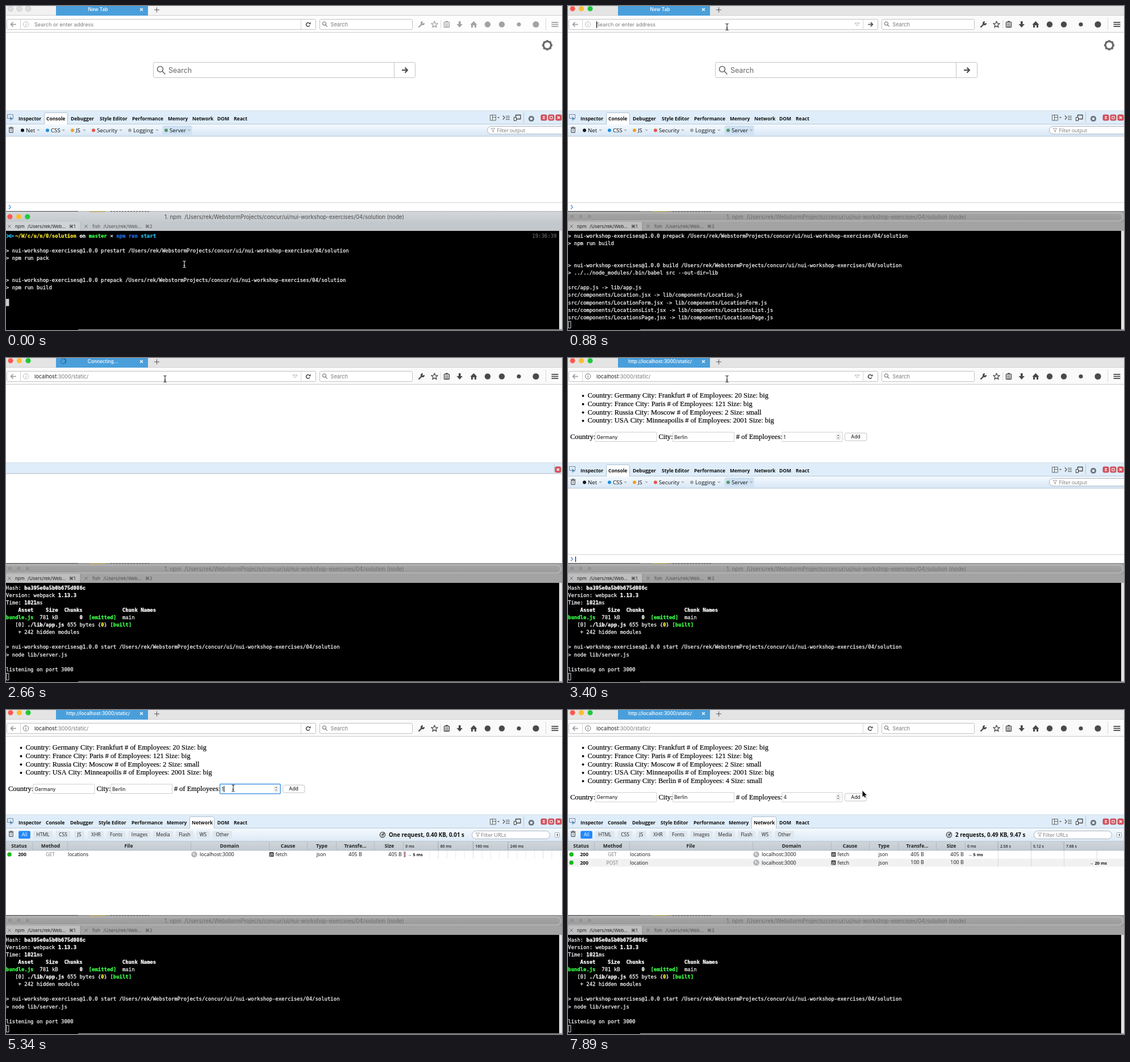
An HTML page with a canvas that plays this animation: 979x572 px, repeating every 8 s.

```html
<!DOCTYPE html>
<html lang="en">
<head>
<meta charset="utf-8">
<title>Workshop demo</title>
<style>
html, body { margin: 0; width: 100%; height: 100%; overflow: hidden; background: #fff; }
canvas { display: block; width: 979px; height: 572px; }
</style>
</head>
<body>
<canvas id="stage" width="979" height="572"></canvas>
<script>
const W = 979, H = 572, LOOP = 8000;
const c = document.getElementById('stage').getContext('2d');
const UI = 'Inter, Roboto, sans-serif';
const DEV = '"Open Sans", "Noto Sans", sans-serif';
const MONO = '"DejaVu Sans Mono", monospace';
const SERIF = '"Liberation Serif", serif';
// extra stroke that gives a font its heavier screen look
const HEAVY = { [MONO]: 0.3, [SERIF]: 0.2 };

// ---------- helpers ----------
function box(x, y, w, h, fill) {
  c.fillStyle = fill;
  c.fillRect(x, y, w, h);
}
function grad(x, y, w, h, a, b) {
  const g = c.createLinearGradient(0, y, 0, y + h);
  g.addColorStop(0, a);
  g.addColorStop(1, b);
  box(x, y, w, h, g);
}
function round(x, y, w, h, r, fill, stroke, lw = 1) {
  c.beginPath();
  c.roundRect(x, y, w, h, r);
  if (fill) { c.fillStyle = fill; c.fill(); }
  if (stroke) { c.strokeStyle = stroke; c.lineWidth = lw; c.stroke(); }
}
function dot(x, y, r, fill, stroke, lw = 1) {
  c.beginPath();
  c.arc(x, y, r, 0, 7);
  if (fill) { c.fillStyle = fill; c.fill(); }
  if (stroke) { c.strokeStyle = stroke; c.lineWidth = lw; c.stroke(); }
}
function path(color, lw, ...pts) {
  c.strokeStyle = color;
  c.lineWidth = lw;
  c.beginPath();
  for (let i = 0; i < pts.length; i += 2) c.lineTo(pts[i], pts[i + 1]);
  c.stroke();
}
function poly(fill, ...pts) {
  c.fillStyle = fill;
  c.beginPath();
  for (let i = 0; i < pts.length; i += 2) c.lineTo(pts[i], pts[i + 1]);
  c.fill();
}
// y is the middle of the capitals; returns the right edge
function text(s, x, y, size, color, family = UI, weight = 400, align = 'left') {
  const base = y + size * (family === SERIF ? 0.33 : 0.36);
  c.font = `${weight} ${size}px ${family}`;
  c.textAlign = align;
  c.fillStyle = c.strokeStyle = color;
  c.fillText(s, x, base);
  if (HEAVY[family]) {
    c.lineWidth = HEAVY[family];
    c.strokeText(s, x, base);
  }
  return x + c.measureText(s).width;
}
function cross(x, y, r, color, lw = 1) {
  path(color, lw, x - r, y - r, x + r, y + r);
  path(color, lw, x - r, y + r, x + r, y - r);
}
function arrow(x, y, r, color, lw) {
  path(color, lw, x - r, y, x + r, y);
  path(color, lw, x + r * 0.1, y - r * 0.9, x + r, y, x + r * 0.1, y + r * 0.9);
}
function lens(x, y, r, color, lw) {
  dot(x, y, r, null, color, lw);
  path(color, lw, x + r * 0.7, y + r * 0.7, x + r * 1.8, y + r * 1.8);
}
function gear(x, y, r, color, lw) {
  for (let i = 0; i < 8; i++) {
    const a = i * Math.PI / 4, u = Math.cos(a), v = Math.sin(a);
    path(color, lw, x + u * r, y + v * r, x + u * r * 1.35, y + v * r * 1.35);
  }
  dot(x, y, r, null, color, lw);
}
function reload(x, y, color) {
  c.strokeStyle = color;
  c.lineWidth = 1.5;
  c.beginPath();
  c.arc(x, y, 3.3, 0.5, 5.4);
  c.stroke();
  poly(color, x + 4.5, y - 4.3, x + 4.5, y - 0.4, x + 0.6, y - 0.4);
}
function globe(x, y, r) {
  dot(x, y, r, '#b4b8bc', '#8d9194', 0.8);
  poly('#e4e6e8', x - r * 0.6, y - r * 0.5, x + r * 0.2, y - r * 0.7, x, y + r * 0.1, x - r * 0.4, y + r * 0.3);
  poly('#e4e6e8', x + r * 0.1, y + r * 0.3, x + r * 0.7, y, x + r * 0.3, y + r * 0.7);
}

// ---------- timeline ----------
const ticks = [0, 150, 300, 450, 590, 740, 880, 1030, 1330, 1630, 2220, 2520, 2660, 2810, 2960,
  3110, 3250, 3400, 3550, 3700, 3850, 4450, 4600, 4750, 4900, 5040, 5190, 5340, 6090, 6390,
  6990, 7140, 7290, 7440, 7590, 7740, 7890];
const latest = (list, t) => list.filter(v => v <= t).pop();
const step = (list, t) => list.filter(v => v[0] <= t).pop()[1];

// start, end, then from and to points
const moves = [
  [0, 740, 314, 456, 280, 37],
  [3400, 3550, 280, 37, 345, 199],
  [4300, 4900, 345, 199, 374, 94],
  [4900, 5190, 374, 94, 400, 138],
  [6840, 7440, 400, 138, 519, 143]
];
function mouseAt(t) {
  const m = moves.filter(v => v[0] <= t).pop();
  const p = Math.min(1, (t - m[0]) / (m[1] - m[0])), e = p * p * (3 - 2 * p);
  return [m[2] + (m[4] - m[2]) * e, m[3] + (m[5] - m[3]) * e];
}
function drawMouse(t) {
  const [x, y] = mouseAt(t);
  const inUrl = y > 23 && y < 42 && x > 45 && x < 519;
  const inField = t > 4450 && y > 130 && y < 148 && x > 377 && x < 470;
  if (y > 397 || inUrl || inField) {
    const ink = y > 397 ? '#fff' : '#111';
    path(ink, 1, x, y - 5, x, y + 5);
    path(ink, 1, x - 2.5, y - 6, x, y - 5, x + 2.5, y - 6);
    path(ink, 1, x - 2.5, y + 6, x, y + 5, x + 2.5, y + 6);
    path(ink, 1, x - 1.5, y + 2, x + 1.5, y + 2);
  } else {
    const pts = [0, 0, 0, 11, 2.5, 8.7, 4.2, 12.3, 5.9, 11.5, 4.3, 8, 7.6, 8];
    const q = pts.map((v, i) => v + (i % 2 ? y : x) - 0.5);
    path('#fff', 1.6, ...q, q[0], q[1]);
    poly('#111', ...q);
  }
}

// ---------- browser chrome ----------
function drawChrome(t) {
  const on = t >= 740, typed = t >= 1630 && t < 2520;
  const loading = t >= 2520 && t < 2960, loaded = t >= 2960;
  const ink = on ? '#4a4a4a' : '#a3a3a3';
  box(0, 0, W, 17, on ? '#e4e4e4' : '#f5f5f5');
  if (!on) box(0, 0, 88, 17, '#f1f1f1');
  box(0, 17, W, 29, on ? '#fafafa' : '#fdfdfd');
  box(0, 16, W, 1, '#cfcfcf');
  box(0, 46, W, 1, '#c9c9c9');
  ['#ff5a52', '#fdbc2e', '#22c93a'].forEach((col, i) =>
    dot(8 + i * 15.5, 4.8, 4.6, on ? col : '#dedede', on ? null : '#c4c4c4'));
  box(88, 0, 162, 17, '#4a9fdb');
  const title = loaded ? 'http://localhost:3000/static/' : loading ? 'Connecting...' : 'New Tab';
  text(title, loading ? 170.5 : 162, 6.3, 8.3, '#fff', UI, 500, 'center');
  if (loading) {
    const a = t / 150;
    dot(101, 5.5, 4.4, null, '#3a7cae', 1.6);
    c.strokeStyle = '#2a5f8a';
    c.beginPath();
    c.arc(101, 5.5, 4.4, a, a + 2);
    c.stroke();
  }
  cross(238.5, 6.3, 2.3, '#fff', 1.4);
  path('#555', 1, 261, 6.8, 270, 6.8);
  path('#555', 1, 265.5, 2.3, 265.5, 11.3);

  round(1.5, 23.5, 544, 18, 2, '#fff', '#c2c2c2');
  box(25, 24, 1, 17, '#d0d0d0');
  box(519, 24, 1, 17, '#d8d8d8');
  path('#9a9a9a', 1.7, 8.5, 32.5, 17.5, 32.5);
  path('#9a9a9a', 1.7, 12.5, 28.5, 8.5, 32.5, 12.5, 36.5);
  const info = loaded ? '#666' : '#b5b5b5';
  dot(35, 32.4, 4.7, null, info, 0.9);
  box(34.5, 31.5, 1, 3.6, info);
  box(34.5, 29.5, 1, 1.1, info);

  if (t < 1630) text('Search or enter address', 50, 32.6, 9.16, '#7a7a7a');
  else if (typed) {
    const end = text('http://localhost:3000/static/', 50, 32.6, 9.18, '#1e1e1e');
    if (t < 2220) box(end + 0.5, 27, 1, 12, '#000');
  } else {
    const end = text('localhost', 50, 32.6, 9.18, '#222');
    text(':3000/static/', end, 32.6, 9.18, '#777');
  }
  if (t >= 740 && t < 1330) box(50, 27, 1, 12, '#000');
  if (on && t < 3550) {
    c.lineWidth = 0.9;
    c.strokeStyle = '#aaa';
    c.beginPath();
    c.moveTo(505, 30); c.lineTo(513, 30); c.lineTo(509, 35); c.closePath();
    c.stroke();
  }
  if (on && t < 2520) arrow(532.5, 32.5, 4, '#444', 1.6);
  else reload(532, 32.7, '#444');
  round(552.5, 23.5, 163, 18, 2, '#fff', '#c2c2c2');
  lens(560.5, 31, 3, '#777', 1.1);
  text('Search', 571.5, 32.6, 9.2, '#7a7a7a');

  // toolbar icons
  path(ink, 2.4, 726.5, 37.5, 733, 31);
  dot(733.5, 30.5, 3.5, ink);
  poly('#fafafa', 733, 31, 734.5, 26, 738.5, 29.5);
  const star = [];
  for (let i = 0; i <= 10; i++) {
    const r = i % 2 ? 2.6 : 6, a = i * Math.PI / 5;
    star.push(754.5 + r * Math.sin(a), 32.8 - r * Math.cos(a));
  }
  path(ink, 1.3, ...star);
  box(765, 25, 1, 14, '#dcdcdc');
  round(771.5, 28.5, 9, 9, 1, null, ink, 1.4);
  [31, 33.2, 35.4].forEach(y => box(773, y, 6, 1, ink));
  box(774, 26.6, 4, 2, ink);
  box(797, 27, 3.6, 6, ink);
  poly(ink, 793.5, 32, 804, 32, 798.8, 38);
  poly(ink, 817.5, 33, 823.5, 26.8, 829.5, 33, 828, 33, 828, 38, 825, 38, 825, 34, 822, 34, 822, 38, 819, 38, 819, 33);
  [[848, 5.2], [873, 5.2], [903, 3.6], [933, 5.6]].forEach(([x, r]) => dot(x, 32.5, r, ink));
  box(950, 21, 1, 22, '#d8d8d8');
  [28, 31.6, 35.2].forEach(y => box(960.5, y, 12, 1.8, ink));
}

function drawPopup() {
  box(0, 47, W, 99, '#fff');
  grad(0, 146, W, 9, '#8f8f8f', 'rgba(220,220,220,0.35)');
  box(1, 50, 978, 23, '#1b83e9');
  globe(35, 61.5, 4.8);
  const end = text('http://localhost:3000/static/', 50, 62, 10.75, '#fff', UI, 600);
  text('— Visit', end + 4, 62.3, 9.2, '#fff');
  ['', '#/', '#/add'].forEach((tail, i) => {
    const y = 85.5 + i * 23.2;
    globe(35, y - 0.8, 4.8);
    text('localhost', 50, y, 10.7, '#222');
    text('—', 100, y, 9.2, '#999');
    text('localhost:3000/static/' + tail, 114, y + 0.3, 9.2, '#2362c0');
  });
}

// ---------- page ----------
function drawNewTab() {
  gear(953, 69.3, 6.8, '#6b6b6b', 3.2);
  round(259.5, 99.5, 461, 27, 2, '#fff', '#c4c4c4');
  box(683, 100, 1, 26, '#c4c4c4');
  lens(271.5, 111.5, 5, '#666', 1.6);
  text('Search', 286, 113.2, 12.4, '#666');
  arrow(702, 113.2, 5, '#4a4a4a', 2.2);
}
function field(x, y, w, value) {
  round(x + 0.5, y - 8, w, 16.5, 0.5, '#fff', '#cfcfcf');
  text(value, x + 3, y + 0.5, 8.6, '#111');
}
function drawPage(t) {
  const rows = ['Germany City: Frankfurt # of Employees: 20 Size: big', 'France City: Paris # of Employees: 121 Size: big',
    'Russia City: Moscow # of Employees: 2 Size: small', 'USA City: Minneapoilis # of Employees: 2001 Size: big'];
  if (t >= 7740) rows.push('Germany City: Berlin # of Employees: 4 Size: small');
  rows.forEach((s, i) => {
    const y = 66.2 + i * 14.7;
    dot(26.5, y + 0.6, 1.9, '#000');
    text('Country: ' + s, 34.5, y, 12.43, '#000', SERIF);
  });
  const y = 139 + (rows.length - 4) * 14.7;
  const label = (s, x) => text(s, x, y - 0.3, 12.43, '#000', SERIF);
  label('Country:', 4);
  field(47.5, y, 108, 'Germany');
  label('City:', 159.5);
  field(184, y, 108, 'Berlin');
  label('# of Employees:', 296);
  const focus = t >= 5340 && t < 7590;
  field(376.5, y, 106, t < 6090 ? '1' : t < 6390 ? '' : '4');
  if (focus) {
    round(376.7, y - 8.2, 106.4, 17, 1.5, null, '#6fb0ec', 2);
    if (t < 6090) box(383.5, y - 5, 1, 11, '#000');
  }
  round(472.5, y - 5, 6.5, 10.5, 3, '#fff', '#c8c8c8', 0.8);
  poly('#666', 474, y - 1, 477.6, y - 1, 475.8, y - 3.4);
  poly('#666', 474, y + 1.4, 477.6, y + 1.4, 475.8, y + 3.8);
  const down = t >= 7590 && t < 7740;
  round(487.5, y - 6.5, 38.5, 13.5, 3, down ? '#4a90e8' : '#fff', '#c3c3c3');
  text('Add', 506.5, y + 0.4, 8.6, down ? '#fff' : '#111', UI, 400, 'center');
}

// ---------- developer tools ----------
const tabNames = ['Inspector', 'Console', 'Debugger', 'Style Editor', 'Performance', 'Memory', 'Network', 'DOM', 'React'];
const consoleX = [22, 71, 114, 165, 222, 285, 328, 372, 401];
const networkX = [22, 70, 113, 163, 221, 283, 327, 372, 401];

function redButton(x, kind) {
  round(x - 5, 192, 10, 10, 2, '#d9525c', '#b5404a', 0.8);
  if (kind === 0) { box(x - 1.5, 194.5, 3, 2, '#fff'); box(x - 1.5, 197.5, 3, 2, '#fff'); }
  if (kind === 1) round(x - 2.2, 194.8, 4.4, 4.4, 0, null, '#fff');
  if (kind === 2) cross(x, 197, 2, '#fff', 1.4);
}
function funnel(x, y) {
  path('#999', 0.9, x, y - 3, x + 7, y - 3, x + 4.4, y, x + 4.4, y + 3.6, x + 2.6, y + 2.4, x + 2.6, y, x, y - 3);
}
function trash() {
  round(5.8, 216, 6.4, 7.5, 1, null, '#444', 1.1);
  path('#444', 1.2, 4.5, 215, 13.5, 215);
  path('#444', 1, 7.5, 213.7, 10.5, 213.7);
  path('#444', 0.8, 9, 217.5, 9, 222);
}
function drawTabs(sel) {
  box(0, 185, W, 23, '#dfedfa');
  box(0, 184.5, W, 0.8, '#c5d3df');
  box(0, 208, W, 1, '#b9c9d8');
  round(2.5, 191.5, 10, 7, 0, null, '#7b8896', 1);
  poly('#5682b4', 7, 195, 12.5, 200, 9.5, 200.3, 8, 203);
  const xs = sel === 1 ? consoleX : networkX;
  const [sx, sw] = sel === 1 ? [67.5, 41] : [323.5, 43];
  round(sx, 188.5, sw, 21, [2, 2, 0, 0], '#fff', '#aebfce');
  box(sx + 0.5, 207.5, sw - 1, 3, '#fff');
  tabNames.forEach((s, i) => text(s, xs[i], 199.3, 8.5, '#111', DEV, 700));
  round(852.5, 192.5, 10, 9.5, 0, null, '#666', 1);
  path('#666', 1, 856.5, 193, 856.5, 202);
  path('#666', 1, 856.5, 196.5, 862, 196.5);
  poly('#666', 865, 196, 869, 196, 867, 198.5);
  path('#555', 1.2, 875, 193.5, 878, 197, 875, 200.5);
  [194, 197, 200].forEach(y => box(880, y, 7, 1, '#555'));
  round(897.5, 192.5, 8.5, 7, 0, null, '#444', 1.3);
  round(894.5, 196.5, 4, 6, 0, '#eef4fa', '#444', 1.1);
  box(911, 188, 1, 18, '#b9c6d2');
  gear(925, 199, 3.7, '#6c747c', 2.7);
  [947, 960, 973].forEach(redButton);
}
function drawConsole(t) {
  grad(0, 209, W, 21, '#f4f9fe', '#d7e6f5');
  box(0, 229.5, W, 1, '#b9c9d8');
  trash();
  round(275.5, 211, 52, 17, 2, '#cfe1f3');
  const filters = [['Net', 35, 57, '#111'], ['CSS', 79, 101, '#1d8fe0'], ['JS', 123, 138, '#f0a020'],
    ['Security', 160, 202, '#e8554a'], ['Logging', 224, 266, '#a0a6ac'], ['Server', 288, 322.5, '#4f9a68']];
  filters.forEach(([s, x, mark, col]) => {
    dot(x - 6, 219.5, 3, col);
    text(s, x, 219.3, 9.7, '#111', DEV);
    poly('#a9b4bf', mark - 3, 218, mark + 3, 218, mark, 221);
  });
  round(847.5, 212.5, 140, 13.5, 7, '#fff', '#aab4be');
  funnel(854, 219);
  text('Filter output', 864.5, 219.5, 8.6, '#777', DEV);
  box(0, 346.5, W, 1, '#cfcfcf');
  path('#3f8fe0', 1.2, 5, 351.5, 8.3, 355, 5, 358.5);
  if (t >= 3400) box(13, 350.5, 1, 9.5, '#000');
}

const columns = [['Status', 23], ['Method', 78.5], ['File', 216], ['Domain', 393.5], ['Cause', 496.5],
  ['Type', 556], ['Transfe...', 615], ['Size', 675]];
function request(y, method, file, size) {
  dot(6, y, 3.8, '#18b818');
  text('200', 28.5, y, 8.6, '#111', DEV, 700, 'center');
  text(method, 78, y, 8.4, '#777', DEV, 400, 'center');
  text(file, 109, y, 8.6, '#111', DEV);
  globe(331.5, y, 4.6);
  text('localhost:3000', 341, y, 9, '#111', DEV);
  round(463.5, y - 4, 8, 8, 1, '#444');
  text('JS', 467.5, y + 0.3, 5.5, '#fff', DEV, 700, 'center');
  text('fetch', 474.5, y, 8.8, '#111', DEV);
  text('json', 555, y, 8.6, '#111', DEV, 400, 'center');
  text(size, 615, y - 0.5, 8.9, '#111', DEV, 400, 'center');
  text(size, 685, y - 0.5, 8.9, '#111', DEV, 400, 'center');
}
function drawNetwork(t) {
  const two = t >= 7740;
  grad(0, 209, W, 23, '#f4f9fe', '#dce9f5');
  trash();
  const pills = [['All', 32.5], ['HTML', 65], ['CSS', 100.5], ['JS', 129], ['XHR', 158.5], ['Fonts', 194],
    ['Images', 235], ['Media', 276.5], ['Flash', 314.5], ['WS', 347], ['Other', 381]];
  pills.forEach(([s, x], i) => {
    c.font = `400 8.5px ${DEV}`;
    const w = c.measureText(s).width + 11;
    round(x - w / 2, 213.5, w, 13.5, 2, i ? '#dfe7ef' : '#2088fa');
    text(s, x, 220.3, 8.5, i ? '#222' : '#fff', DEV, 400, 'center');
  });
  round(820.5, 213.5, 137, 14, 7, '#fff', '#aab4be');
  funnel(827, 220);
  text('Filter URLs', 836, 220.3, 9, '#777', DEV);
  round(966.5, 216.5, 8, 8, 1, '#fff', '#9aa5b0');
  poly('#667', 972, 218, 972, 223, 969, 220.5);
  if (t < 3850) return;
  grad(0, 232, W, 16, '#cfd6dc', '#c2cad1');
  box(0, 231.5, W, 0.8, '#aeb8c1');
  box(0, 247.5, W, 0.8, '#aeb8c1');
  columns.forEach(([s, x]) => text(s, x, 240.3, 8.6, '#222', DEV, 700, 'center'));
  [46, 108, 325, 463, 530, 581, 648, 699].forEach(x => box(x, 233, 0.8, 14, '#aab4bd'));
  if (t < 4450) return;

  const sx = two ? 671 : 663;
  dot(sx, 220.3, 4.6, null, '#333', 1.2);
  path('#333', 1.2, sx, 220.5, sx + 3.5, 216.5);
  dot(sx, 220.5, 1.8, null, '#333', 1);
  text(two ? '2 requests, 0.49 KB, 9.47 s' : 'One request, 0.40 KB, 0.01 s', sx + 11, 220.5, 9.82, '#111', DEV, 700);
  const gap = two ? 58 : 61.5, x0 = two ? 699 : 699.3;
  const unit = two ? ['0 ms', '2.56 s', '5.12 s', '7.68 s'] : ['0 ms', '80 ms', '160 ms', '240 ms'];
  unit.forEach((s, i) => {
    if (i) for (let y = 233; y < 248; y += 3) box(x0 + i * gap - 0.3, y, 1, 1.8, '#7d8893');
    text(s, x0 + i * gap + 4, 240.8, 6.9, '#222', DEV, 600);
  });
  if (two) box(0, 262.5, W, 14, '#f1f1f1');
  for (let i = 3; x0 + i * gap / 4 < W; i++) {
    const x = x0 + i * gap / 4, major = i % 4 === 0;
    if (two && !major) continue;
    box(x, 248, 0.8, two ? 28 : 14.5, major ? '#d0d4d8' : '#e2e4e7');
  }
  request(255, 'GET', 'locations', '405 B');
  if (!two) {
    box(700.5, 250, 3, 10, '#8c8790');
    box(701.3, 250, 1, 10, '#d88');
  }
  text('→ 5 ms', two ? 704 : 707, 255.3, 7.5, '#111', DEV, 700);
  if (two) {
    request(269.5, 'POST', 'location', '100 B');
    text('→ 20 ms', 918, 269.8, 7.5, '#111', DEV, 700);
  }
}
function drawTools(t) {
  if (t >= 2660 && t < 3110) {
    box(0, 185, W, 18.5, '#dfedfa');
    box(0, 184.5, W, 0.8, '#c5d3df');
    box(0, 203.5, W, 1, '#a9b7c4');
    box(965, 187, 1, 15, '#b9c6d2');
    redButton(972, 2);
    return;
  }
  const net = t >= 3700;
  drawTabs(net ? 6 : 1);
  if (net) drawNetwork(t);
  else if (t < 2660 || t >= 3250) drawConsole(t);
}

// ---------- terminal ----------
const home = '/Users/rek/WebstormProjects/concur/ui/nui-workshop-exercises/04/solution';
const task = s => `> nui-workshop-exercises@1.0.0 ${s} ${home}`;
const built = s => `src/${s} -> lib/${s.replace('jsx', 'js')}`;
// "^" and a letter switch the text style
const lines = [
  '^c⋊> ^y~/W/c/u/n/0/solution^W on ^gmaster^w × ^bnpm run ^cstart', '',
  task('prestart'), '> npm run pack', '', '',
  task('prepack'), '> npm run build', '', '',
  task('build'), '> ../../node_modules/.bin/babel src --out-dir=lib', '',
  ...['app.js', 'components/Location.jsx', 'components/LocationForm.jsx', 'components/LocationsList.jsx',
    'components/LocationsPage.jsx', 'server.js', 'service/locations.js'].map(built), '',
  task('pack'), '> ../../node_modules/.bin/webpack --config=webpack.config.babel.js', '',
  'Hash: ^Wba395e0a5b0b675d086c', 'Version: webpack ^W1.13.3', 'Time: ^W1021^wms',
  '^W    Asset    Size  Chunks             Chunk Names',
  '^gbundle.js^w  781 kB       ^W0  ^g[emitted]^w  main',
  '   [0] ^W./lib/app.js^w 655 bytes {^y0^w} ^g[built]',
  '    + 242 hidden modules', '',
  task('start'), '> node lib/server.js', '', 'listening on port 3000'
];
const style = { w: ['#f4f4f4', 400], W: ['#fff', 700], y: ['#f5e52c', 700], g: ['#3dff4a', 700], b: ['#1f6fe8', 700], c: ['#22bdf0', 700] };
const PITCH = 13.08, CELL = 5.394;
// how many lines are finished at each time
const output = [[0, 9], [450, 13], [740, 14], [880, 18], [1030, 24], [2220, 35], [2520, 36]];

function drawLine(s, y) {
  let col = 0;
  ('^w' + s).split('^').slice(1).forEach(part => {
    const [color, weight] = style[part[0]], run = part.slice(1);
    text(run, col * CELL, y, 8.96, color, MONO, weight);
    col += run.length;
  });
}
function drawTerminal(t) {
  const on = t < 740;
  if (on) grad(0, 362, W, 19, '#d4d8db', '#c5cace');
  else {
    grad(0, 362, W, 19, '#a8a8a8', '#999');
    round(-14, 365.5, W + 12, 14, 9, null, '#b6b6b6', 2);
  }
  // sliver of the window behind
  box(0, 362, W, 1.2, on ? '#b5b5b5' : '#8a8a8a');
  box(0, 362, 127, 1, '#4d4d4d');
  box(147, 362, 28, 1.6, '#b8a860');
  for (let x = 184; x < 252; x += 5) box(x, 362, 3, 1.2, '#555');
  ['#ff5a52', '#fdbc2e', '#22c93a'].forEach((col, i) =>
    dot(7 + i * 15.4, 372, 4.6, on ? col : '#959595', on ? null : '#adadad'));
  text(`1. npm  ${home} (node)`, 490, 372.3, 9.72, on ? '#4c4c4c' : '#6e6e6e', UI, 400, 'center');
  box(0, 381, W, 16, on ? '#c3c8cc' : '#a3a3a3');
  box(0, 381, 130.5, 16, on ? '#cfd3d6' : '#bebebe');
  box(130.5, 381, 1, 16, on ? '#b4b9bd' : '#939393');
  [['npm', 16, 38, 111, '1', '#222'], ['fish', 152, 171.5, 245, '2', '#505050']].forEach(([s, x, px, kx, n, col], i) => {
    cross(i ? 141 : 6, 389, 2.7, '#666', 0.9);
    text(s, x, 389.2, 8.1, col);
    text('/Users/rek/Web...', px, 389.2, 8.1, col);
    text('⌘' + n, kx, 389.2, 7.9, col, UI + ', "DejaVu Sans"');
  });

  box(0, 397, W, 175, '#000');
  box(974, 397, 5, 175, '#e3e3e3');
  box(127, 570.7, W - 127, 1.3, '#8d8d8d');
  const n = step(output, t), top = Math.max(0, n - 12);
  for (let i = top; i < n; i++) drawLine(lines[i], 405.6 + (i - top) * PITCH);
  if (!top) text('19:36:39', 926.5, 405.6, 8.96, '#5c5c5c', MONO);
  const y = 405.6 + (n - top) * PITCH;
  if (on) box(0, y - 6.3, 5.4, 12.8, '#c8ccd0');
  else round(0.5, y - 6, 4.4, 12, 0, null, '#d8d8d8', 1);
}

function draw(now) {
  const t = latest(ticks, now % LOOP);
  c.clearRect(0, 0, W, H);
  box(0, 0, W, 362, '#fff');
  c.textBaseline = 'alphabetic';
  c.lineJoin = 'round';
  if (t < 2520) drawNewTab();
  else if (t >= 2960) drawPage(t);
  drawTools(t);
  drawChrome(t);
  if (t >= 1630 && t < 2520) drawPopup();
  drawTerminal(t);
  drawMouse(t);
  requestAnimationFrame(() => draw(performance.now()));
}
draw(performance.now());
</script>
</body>
</html>
```
